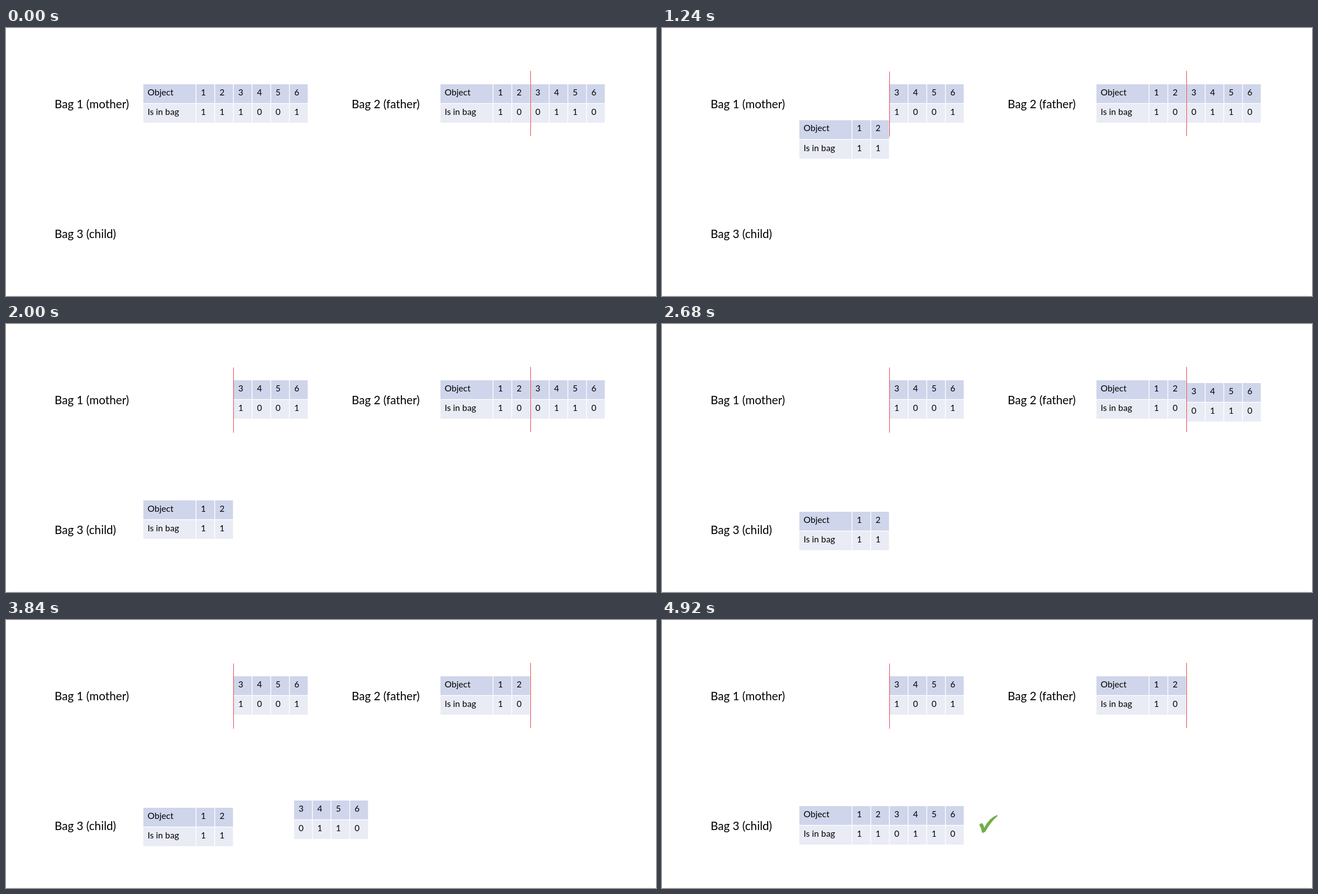
An HTML page for the animation above (7020 ms loop, 1164 px wide and 481 px high).

```html
<!DOCTYPE html>
<html lang="en">
<head>
<meta charset="utf-8">
<title>Crossover of two bags</title>
<style>
  html, body { margin: 0; width: 100%; height: 100%; overflow: hidden; background: #fff; }
  svg { display: block; width: 1164px; height: 481px; font-family: Lato, "Open Sans", sans-serif; }
  .title { font-size: 20.7px; }
  .name { font-size: 15.7px; }
  .digit { font-size: 15.3px; text-anchor: middle; }
</style>
</head>
<body>
<svg id="stage" viewBox="0 0 1164 481"></svg>
<script>
const LOOP = 7020, STEP = 40;
const HEAD = '#cfd5ea', ROW = '#e9ebf5', RED = '#ee4349', GREEN = '#70ad47';
const NAME_W = 95, COL_W = 33.45, ROW_H = 35.2, GAP = 1.4;
const stage = document.getElementById('stage');

function add(parent, tag, attrs, text) {
  const el = document.createElementNS('http://www.w3.org/2000/svg', tag);
  for (const key in attrs) el.setAttribute(key, attrs[key]);
  if (text !== undefined) el.textContent = text;
  parent.append(el);
  return el;
}

const rect = (parent, x, y, width, height, fill) =>
  add(parent, 'rect', { x, y, width, height, fill });

function column(parent, x, y, width, top, bottom, cls, inset) {
  [top, bottom].forEach((text, i) => {
    const cy = y + i * ROW_H;
    rect(parent, x, cy, width - GAP, ROW_H - GAP, i ? ROW : HEAD);
    add(parent, 'text', { x: x + inset, y: cy + 20, class: cls }, text);
  });
}

// Columns from..to of a table whose left edge is x; column 0 holds the row names.
function table(parent, x, y, bits, from, to) {
  const g = add(parent, 'g', {});
  for (let i = from; i <= to; i++) {
    if (i === 0) column(g, x, y, NAME_W, 'Object', 'Is in bag', 'name', 7.6);
    else column(g, x + NAME_W + (i - 1) * COL_W, y, COL_W, i, bits[i - 1], 'digit', 12.5);
  }
  return g;
}

const title = (x, y, text) => add(stage, 'text', { x, y, class: 'title' }, text);

title(87, 144, 'Bag 1 (mother)');
title(619, 144, 'Bag 2 (father)');
title(87, 376.5, 'Bag 3 (child)');
rect(stage, 8, 480, 1148, 1, '#f4f4f4');

table(stage, 246, 101, '111001', 3, 6);
table(stage, 778, 101, '100110', 0, 2);
const motherPart = table(stage, 246, 101, '111001', 0, 2);
const fatherPart = table(stage, 778, 101, '100110', 3, 6);
const cut = rect(stage, 407, 78, 1, 117, RED);
rect(stage, 939, 77, 1, 117, RED);

const result = add(stage, 'g', {});
rect(result, 244, 332, 300, 78, '#fff');
table(result, 246, 334, '110110', 0, 6);
add(result, 'path', {
  fill: GREEN,
  d: 'M568 368Q571 364 573.5 365Q576 367 577 373Q586 355 600 350L601 351.5' +
     'Q588 363 579 380Q576 382 573 382Q572 373 568 368Z'
});

const ramp = (t, start, length) => Math.min(1, Math.max(0, (t - start) / length));
const smooth = u => u * u * (3 - 2 * u);

// Time, x, y along the curved path of the father's part.
const PATH = [
  [2540, 0, 0], [2680, 0, 5], [2920, -1, 30], [3360, -86, 152],
  [3640, -299, 202], [3840, -424, 223], [4180, -532, 236]
];

function tangent(i, axis) {
  if (i === 0 || i === PATH.length - 1) return 0;
  const [a, b, c] = PATH.slice(i - 1, i + 2);
  const h = b[0] - a[0], k = c[0] - b[0];
  return ((b[axis] - a[axis]) / h * k + (c[axis] - b[axis]) / k * h) / (h + k);
}

function along(t, axis) {
  const last = PATH.length - 1;
  if (t <= PATH[0][0]) return 0;
  if (t >= PATH[last][0]) return PATH[last][axis];
  const i = PATH.findIndex(p => p[0] > t) - 1;
  const a = PATH[i], b = PATH[i + 1], h = b[0] - a[0], u = (t - a[0]) / h;
  return a[axis] + (b[axis] - a[axis]) * smooth(u) +
    h * u * (1 - u) * (tangent(i, axis) * (1 - u) - tangent(i + 1, axis) * u);
}

const move = (el, x, y) =>
  el.setAttribute('transform', `translate(${x.toFixed(2)} ${y.toFixed(2)})`);

function draw() {
  const t = Math.floor(performance.now() % LOOP / STEP) * STEP;
  cut.setAttribute('opacity', ramp(t, 40, 520));
  move(motherPart, 0, 236 * smooth(ramp(t, 690, 1600)));
  move(fatherPart, along(t, 1), along(t, 2));
  result.setAttribute('opacity', ramp(t, 4400, 520));
  requestAnimationFrame(draw);
}
draw();
</script>
</body>
</html>
```
